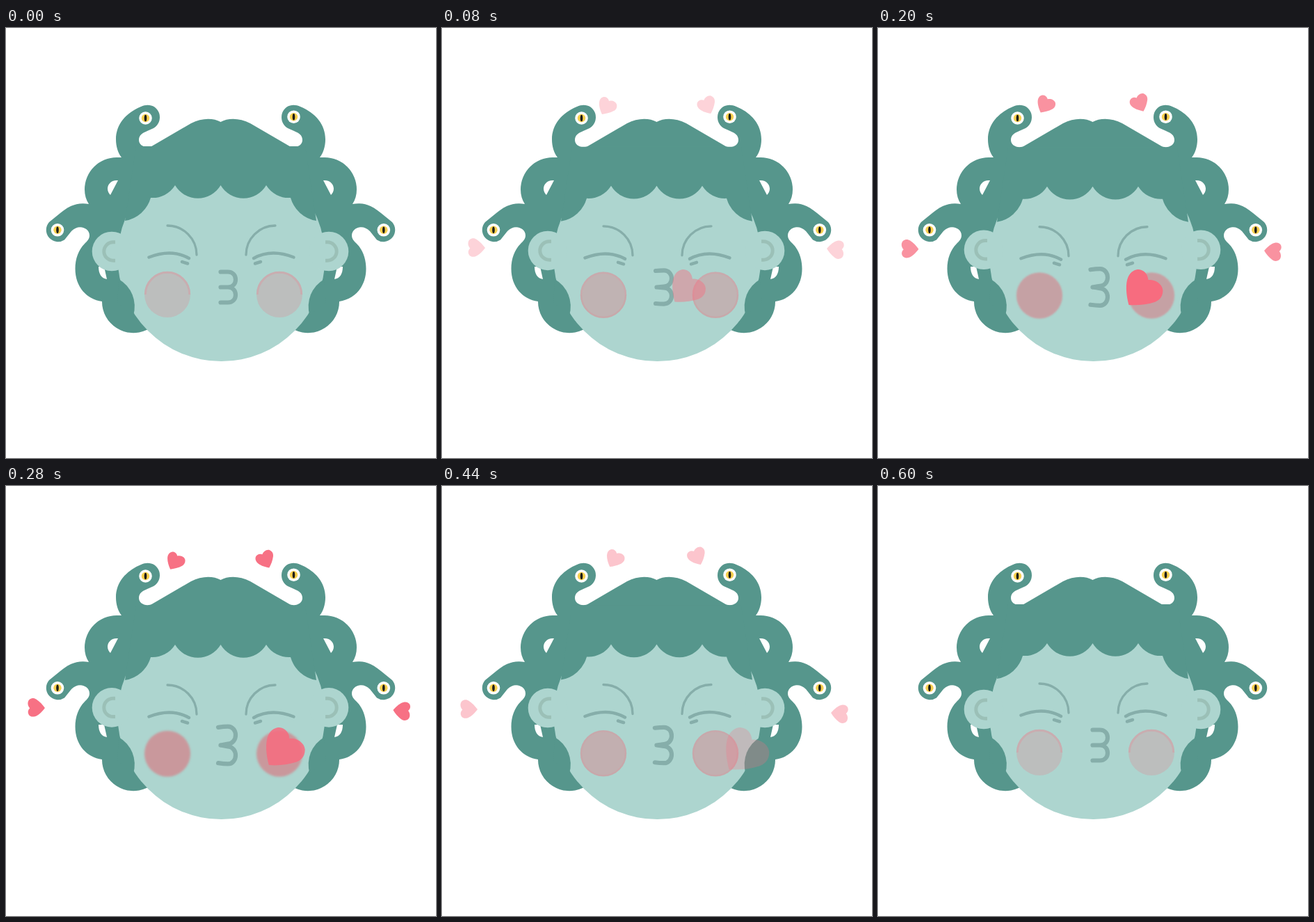
An HTML page for the animation above (0.96 s loop, 618 px wide and 618 px high).

```html
<!DOCTYPE html>
<html lang="en">
<head>
<meta charset="utf-8">
<title>Snake-haired kiss</title>
<style>
  html, body { margin: 0; width: 100%; height: 100%; overflow: hidden; background: #fff; }
  svg { display: block; width: 100vw; height: 100vh; }
  .hair { fill: #56968c; }
  .skin { fill: #add5cf; }
  .line { fill: none; stroke: #86aeaa; stroke-width: 4.5; stroke-linecap: round; stroke-linejoin: round; }
</style>
</head>
<body>
<svg viewBox="0 0 618 618">
  <defs>
    <!-- tip at the origin, leaning right -->
    <path id="heart" fill="#f76c7f" d="M0 0C-4-15-5-31-1-40C3-49 10-51 14-51C22-50 27-45 28-36C37-37 48-31 49-21C49-10 42-6 37-4C25 0 11 1 0 0Z"/>
    <g id="snakeEye">
      <circle r="9.3" fill="#fff"/>
      <circle r="5.7" fill="#f7d04f"/>
      <ellipse rx="1.8" ry="4.8" fill="#1c1c1a"/>
    </g>
    <g id="cheek">
      <g class="blush">
        <circle r="33" fill="#bcbebd"/>
        <circle class="pink" r="33" fill="#ca979b"/>
        <circle class="ring" r="32" fill="none" stroke="#cf9ca0" stroke-width="2.5"/>
      </g>
      <path class="arc" d="M-31.7 0A31.7 31.7 0 0 1 31.7 0" fill="none" stroke="#c9adb0" stroke-width="3"/>
    </g>
  </defs>

  <g id="locks">
    <path class="hair" d="M308.5 135C298 129 281 129 266 137L211 169C203 174 191 170 191 161C191 154 196 151 203 148
      L212 144C219 140 223 131 220 122C216 111 204 108 194 113C172 122 158 139 158 160C158 170 161 180 166 186
      L159 186A46 46 0 0 0 113 232C113 240 115 247 119 253C102 250 90 256 78 266L62 279A17 17 0 0 0 84 304.5
      L94 292C104 281 120 287 120 298C120 303 117 306 113 310C104 319 99.5 332 99.5 346C99.5 372 116 390 138 393
      A45 45 0 0 0 202 434L311 400V137Z"/>
    <path fill="#fff" d="M161 219C151 218 146 225 146 231C146 235 148 238 150 240ZM133 343C133 353 137 360 145 361L141 343Z"/>
  </g>
  <use href="#locks" transform="matrix(-1 0 0 1 617 0)"/>

  <circle class="skin" cx="309.5" cy="330" r="149"/>

  <g id="curl"><path class="hair" d="M162 361A45 45 0 0 1 183 413L160 395Z"/></g>
  <use href="#curl" transform="matrix(-1 0 0 1 619.5 0)"/>

  <path id="fringe" class="hair" d="M171 277A46 46 0 0 0 208 244A38 38 0 0 0 243 226A38 38 0 0 0 308.5 226
    A38 38 0 0 0 374 226A38 38 0 0 0 409 244A46 46 0 0 0 446 277L430 170H187Z"/>

  <g id="ears">
    <g id="ear">
      <circle class="skin" cx="152" cy="321" r="28.3"/>
      <path d="M157 307.8H154A13 13 0 0 0 154 334.2H157" fill="none" stroke="#9bc0b7" stroke-width="5"/>
    </g>
    <use href="#ear" transform="matrix(-1 0 0 1 616 0)"/>
  </g>

  <g id="eyes">
    <g id="eye" class="line">
      <path stroke-width="3.3" style="stroke-width:3.3" d="M232 284A42 42 0 0 1 274 326"/>
      <path d="M205.5 329.5Q238 317 263 331M253 336L261 338.5"/>
    </g>
    <use href="#eye" transform="matrix(-1 0 0 1 619 0)"/>
  </g>

  <path id="mouth" class="line" style="stroke-width:6.2"/>

  <g id="cheeks">
    <use href="#cheek" x="232" y="383"/>
    <use href="#cheek" x="393" y="383"/>
  </g>

  <use href="#snakeEye" x="200.5" y="129.5"/>
  <use href="#snakeEye" x="413.5" y="127.7"/>
  <use href="#snakeEye" x="74" y="290.3"/>
  <use href="#snakeEye" x="542.8" y="290.3"/>

  <g id="hearts"></g>
</svg>
<script>
const $ = id => document.getElementById(id);
const clamp = v => Math.max(0, Math.min(1, v));
const LOOP = 960, STEP = 40, ACTIVE = 600;

// tip at t = 0, speed per ms, turn in degrees
const smallHearts = [
  [227.5, 125.8, .031, -.022, -10],
  [389.5, 125.2, -.04, -.0275, -65],
  [64.5, 315, -.0306, .0139, -129],
  [551.7, 315, .0167, .025, 55]
];

function addHeart() {
  const el = document.createElementNS("http://www.w3.org/2000/svg", "use");
  el.setAttribute("href", "#heart");
  return $("hearts").appendChild(el);
}
const small = smallHearts.map(addHeart), big = addHeart();

function place(el, x, y, turn, scale, alpha) {
  el.setAttribute("transform", `translate(${x} ${y}) rotate(${turn}) scale(${scale})`);
  el.setAttribute("opacity", alpha);
}

const shift = (id, dy) => $(id).setAttribute("transform", `translate(0 ${dy})`);

// one half of the lips; side -1 is the upper, 1 the lower
function lip(p, side) {
  const y = d => 372.5 + side * d;
  const top = 22 + 5 * p, mid = 11 + 3.5 * p, low = 2 * p;
  return `M${308.5 - 3.5 * p} ${y(22 + 3.7 * p)}Q313 ${y(top)} 319 ${y(top)}` +
    `C326 ${y(top)} 330 ${y(mid + 6)} 330 ${y(mid)}S326 ${y(low)} 319 ${y(low)}` +
    `Q314 ${y(low / 2)} 308.5 372.5`;
}

function draw(t) {
  const pose = Math.sin(Math.PI * t / ACTIVE);
  const glow = clamp(Math.min(t / 270, (550 - t) / 280));

  shift("fringe", 2 * pose);
  shift("eyes", 2 * pose);
  shift("ears", -2.6 * pose);
  shift("cheeks", 1.7 * pose);
  $("mouth").setAttribute("d", lip(pose, -1) + lip(pose, 1));

  const cheek = $("cheek"), part = name => cheek.querySelector(name).style;
  part(".blush").filter = glow ? `blur(${1.6 * glow}px)` : "none";
  part(".pink").opacity = glow;
  part(".ring").opacity = .7 * Math.min(1, 4 * glow) * (1 - glow);
  part(".arc").opacity = clamp(1 - 2 * glow);

  smallHearts.forEach(([x, y, vx, vy, turn], i) =>
    place(small[i], x + vx * t, y + vy * t, turn, .475, glow));

  const scale = .85 + .00075 * t;
  place(big, 314.5 + .2147 * t + 3 * scale, 347 + 51 * scale, 0, scale,
    clamp(Math.min(t / 180, (510 - t) / 270)));
}

function tick() {
  const ms = performance.now() % LOOP;
  draw(Math.min(ACTIVE, Math.floor(ms / STEP) * STEP));
  requestAnimationFrame(tick);
}
tick();
</script>
</body>
</html>
```
